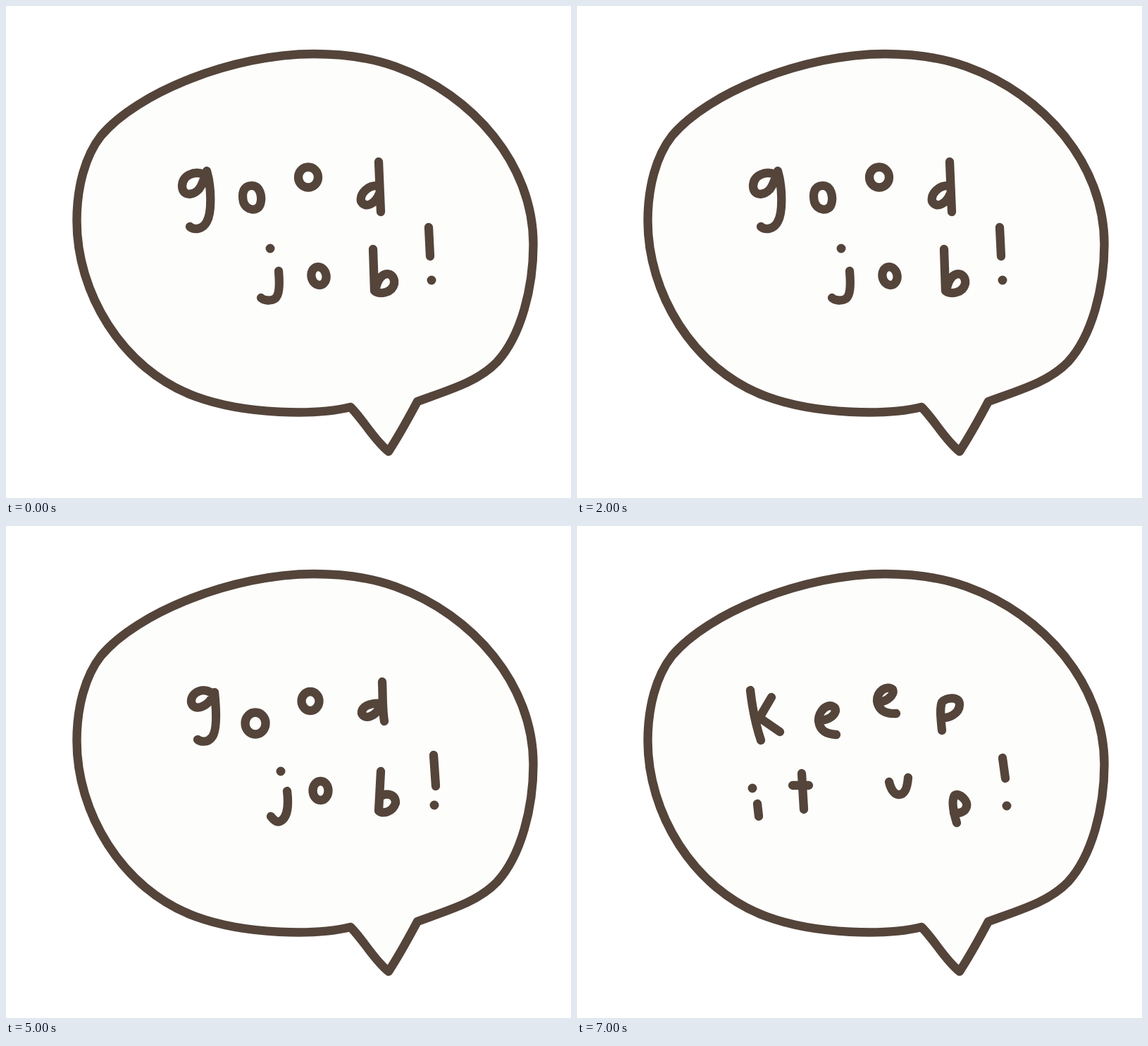
Write an HTML page that moves like this. It is 802 px wide and 698 px high and loops after 8 s.

```html
<!DOCTYPE html>
<html lang="en">
<head>
<meta charset="utf-8">
<title>Speech bubble</title>
<style>
  html, body { margin: 0; width: 100%; height: 100%; overflow: hidden; background: #fff; }
  svg { display: block; width: 802px; height: 698px; }
  path, ellipse { fill: none; stroke: #54443a; stroke-width: 12.3; stroke-linecap: round; stroke-linejoin: round; }
  .bubble { fill: #fdfefc; stroke-width: 12.4; }
  .dot { stroke-width: 13; }
  .pose { visibility: hidden; animation: 8s step-end infinite; }
  .good-a { animation-name: good-a; }
  .good-b { animation-name: good-b; }
  .keep-a { animation-name: keep-a; }
  .keep-b { animation-name: keep-b; }
  @keyframes good-a {
    0%, 25%, 50% { visibility: visible; }
    12.5%, 37.5%, 62.5%, 100% { visibility: hidden; }
  }
  @keyframes good-b {
    0%, 25%, 50%, 75%, 100% { visibility: hidden; }
    12.5%, 37.5%, 62.5% { visibility: visible; }
  }
  @keyframes keep-a {
    0%, 87.5%, 100% { visibility: hidden; }
    75% { visibility: visible; }
  }
  @keyframes keep-b {
    0% { visibility: hidden; }
    87.5%, 100% { visibility: visible; }
  }
</style>
</head>
<body>
<svg viewBox="0 0 802 698">
  <path class="bubble" d="M489 569C440 581 340 580 269 554C163 515 100.500 405 100.500 305C100.500 258 112 213 135 184C186 123 322 68 437 68C478 68 520 74 553 86C664 126 748.500 226 748.500 338C748.500 400 731 468 697 505C670 533 631 544 584 561C571 585 560 606 543 632C522 615 508 588 489 569Z"/>

  <g class="pose good-a" role="img" aria-label="good job!">
    <path d="M281 239C268 233 250 240 250 256C251 272 270 269 277 255C281 247 283 240 285 234C291 254 293 292 285 306C280 316 268 319 261 313"/>
    <path d="M347 255C361 253 364 271 361 281C357 293 341 290 337 278C334 264 338 256 347 255Z"/>
    <ellipse cx="429" cy="243" rx="14" ry="14.500"/>
    <path d="M529 221L532 292M528 255C514 254 502 266 504 277C510 288 524 281 530 266"/>
    <path d="M387 376C389 400 387 411 382 415C376 419 366 418 362 414"/>
    <ellipse cx="444" cy="383" rx="10.500" ry="13" transform="rotate(-12 444 383)"/>
    <path d="M521 345L523 404C531 410 548 407 551 394C553 377 531 372 525 400"/>
    <path d="M600 314L602 355"/>
    <path class="dot" d="M375 344h0M604 389h0"/>
  </g>

  <g class="pose good-b" role="img" aria-label="good job!">
    <path d="M292 237C280 228 262 236 263 250C266 264 288 258 296 236C298 255 301 290 292 300C286 308 276 306 272 303"/>
    <ellipse cx="354" cy="280" rx="14.500" ry="15.500"/>
    <ellipse cx="432" cy="248.500" rx="12.500" ry="13.500"/>
    <path d="M534 221C535 240 534 258 537 277M533 252C518 250 504 256 505 266C509 275 524 272 533 253"/>
    <path d="M399 376C402 400 398 415 389 419C384 421 379 416 376 412"/>
    <ellipse cx="446.500" cy="375.500" rx="11" ry="13.500"/>
    <path d="M532 348L529 404C535 409 549 406 553 393C553 380 540 378 531 384"/>
    <path d="M607 325L610 369"/>
    <path class="dot" d="M390 348h0M608 396h0"/>
  </g>

  <g class="pose keep-a" role="img" aria-label="keep it up!">
    <path d="M255 231C255 260 256 285 259 312M286 245L260 270L286 300"/>
    <path d="M341 269C353 268 365 262 361 254C353 246 338 256 339 272C341 287 352 289 362 287"/>
    <path d="M420 253C436 251 446 240 440 233C430 225 417 236 417 251C419 268 430 271 446 270"/>
    <path d="M514 292C509 265 504 246 513 242C525 236 535 244 533 255C531 264 520 268 512 268"/>
    <path d="M250 396V418"/>
    <path d="M308 353L309 404M297 374L321 373"/>
    <path d="M435 371C435 385 440 393 447 393C456 393 460 382 459 366"/>
    <path d="M531 432C530 415 527 395 530 385C537 378 550 386 548 397C547 406 538 408 531 407"/>
    <path d="M600 334L601 366"/>
    <path class="dot" d="M250 370h0M604 402h0"/>
  </g>

  <g class="pose keep-b" role="img" aria-label="keep it up!">
    <path d="M246 233C249 260 253 280 261 304M276 243L259 272L288 292"/>
    <path d="M347 276C361 274 370 265 366 258C357 249 342 262 343 277C345 291 354 295 368 296"/>
    <path d="M428 250C441 249 451 239 448 232C440 225 426 234 426 248C428 263 440 267 453 266"/>
    <path d="M518 290C516 270 515 258 518 250C524 243 543 241 543 253C543 266 528 273 519 272"/>
    <path d="M256 394L258 412"/>
    <path d="M319 351L322 402M306 368H329"/>
    <path d="M443 363C446 376 452 382 458 381C466 380 469 370 470 357"/>
    <path d="M539 421C535 408 531 390 536 382C543 378 555 390 553 398C551 406 543 408 535 407"/>
    <path d="M604 329L608 358"/>
    <path class="dot" d="M249 372h0M610 397h0"/>
  </g>
</svg>
</body>
</html>
```
